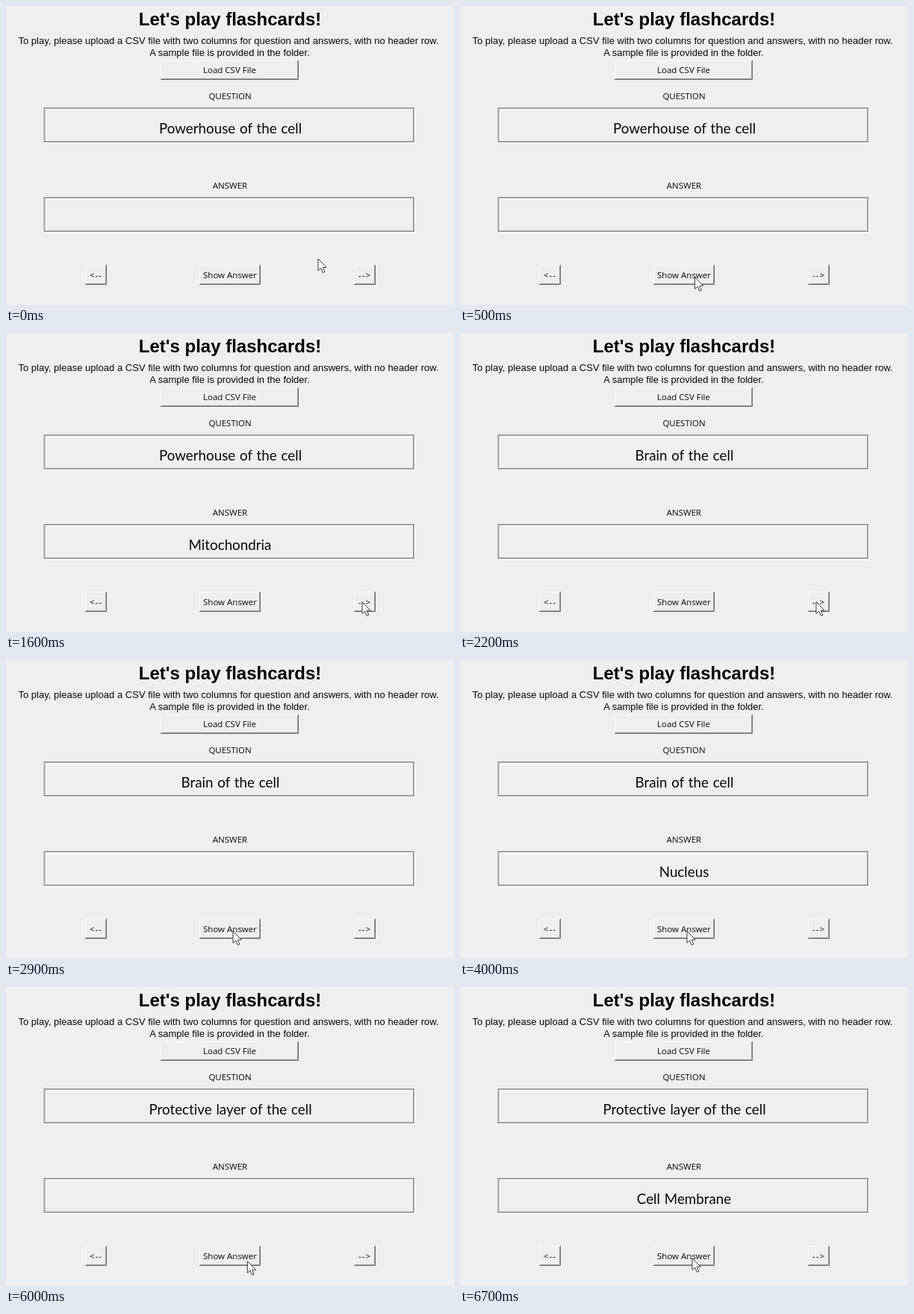
Recreate the animation shown at these times as an HTML page. Size 600x401 px, loop 7.1 s.

```html
<!DOCTYPE html>
<html lang="en">
<head>
<meta charset="utf-8">
<title>Flashcards</title>
<style>
  html, body { margin: 0; width: 100%; height: 100%; overflow: hidden; background: #f0eff0; }
  svg { display: block; width: 600px; height: 401px; }
  text { text-anchor: middle; fill: #080808; font-kerning: none; }
  .title { font: bold 24px "Liberation Sans", Arial, sans-serif; fill: #000; }
  .intro { font: 13px "Liberation Sans", Arial, sans-serif; }
  .wide { letter-spacing: .02px; }
  .label { font: 11.5px "Open Sans", "Segoe UI", sans-serif; }
  .arrow { letter-spacing: 1px; }
  .card { font: 18.8px Lato, Carlito, sans-serif; word-spacing: 1px; font-variant-ligatures: none; }
  .groove, .edge { fill: none; }
  .groove { stroke-width: 2; }
  .dark { stroke: #a0a0a0; }
  .light { stroke: #fbfbfb; }
  .outer { stroke: #696969; }
  .pressed .light { stroke: #696969; }
  .pressed .outer { stroke: #fff; }
  .pressed .dark { stroke: #e3e3e3; }
  .pressed text { transform: translate(1px, 1px); }
</style>
</head>
<body>
<svg viewBox="0 0 600 401">
  <text class="title" x="300" y="26">Let's play flashcards!</text>
  <text class="intro wide" x="298" y="51">To play, please upload a CSV file with two columns for question and answers, with no header row.</text>
  <text class="intro" x="299.5" y="67">A sample file is provided in the folder.</text>
  <text class="label" x="300" y="125">QUESTION</text>
  <text class="label" x="300" y="245">ANSWER</text>
  <g id="panels"></g>
  <g id="buttons"></g>
  <text class="card" id="question" x="300.5" y="171"></text>
  <text class="card" id="answer" x="300" y="291"></text>
  <path id="cursor" d="M.5 .5V16.5L4.2 13L6.8 19.2L9.3 18.2L6.8 12.2H11.6Z"
        fill="#fff" stroke="#3a3a3a" stroke-linejoin="round"/>
</svg>
<script>
const LOOP = 7100, STEP = 100;
const $ = id => document.getElementById(id);

const cards = [
  { from: 0, reveal: 1000, q: "Powerhouse of the cell", a: "Mitochondria" },
  { from: 2100, reveal: 3800, q: "Brain of the cell", a: "Nucleus" },
  { from: 5000, reveal: 6400, q: "Protective layer of the cell", a: "Cell Membrane" }
];

// Pointer trips: start, end, target x and y, downward bow
const trips = [
  [0, 500, 314, 363, 0],
  [1200, 1600, 476.5, 360, 0],
  [2300, 2900, 303.5, 363, 0],
  [4100, 4700, 477.5, 365, 4],
  [5500, 6100, 310.5, 363, 8]
];
const home = [417.5, 338.5];
const presses = { show: [900, 3700, 6300], next: [2000, 4900] };

const panel = y => `
  <rect class="groove light" x="53.5" y="${y + 2}" width="494.5" height="45"/>
  <rect class="groove dark" x="51.5" y="${y}" width="494.5" height="45"/>`;

const button = (id, x, y, w, h, label, cls = "") => `
  <g id="${id}">
    <path class="edge light" d="M${x + .5} ${y + h - 1}V${y + .5}H${x + w - 1}"/>
    <path class="edge dark" d="M${x + 1} ${y + h - 1.5}H${x + w - 1.5}V${y + 1}"/>
    <path class="edge outer" d="M${x} ${y + h - .5}H${x + w - .5}V${y}"/>
    <text class="label ${cls}" x="${x + w / 2}" y="${y + h - 9}">${label}</text>
  </g>`;

$("panels").innerHTML = panel(137) + panel(257);
$("buttons").innerHTML =
  button("load", 207, 73, 185, 26, "Load CSV File") +
  button("prev", 106, 347, 29, 27, "&lt;--", "arrow") +
  button("show", 259, 347, 82, 27, "Show Answer") +
  button("next", 466, 347, 29, 27, "--&gt;", "arrow");

function pointerAt(t) {
  let [x, y] = home;
  for (const [start, end, tx, ty, bow] of trips) {
    if (t < start) break;
    const p = Math.min(1, (t - start) / (end - start));
    const e = p * p * (3 - 2 * p);
    x += (tx - x) * e;
    y += (ty - y) * e + bow * Math.sin(Math.PI * p);
  }
  return [x, y];
}

function draw(t) {
  const card = cards.filter(c => t >= c.from).pop();
  $("question").textContent = card.q;
  $("answer").textContent = t >= card.reveal ? card.a : "";
  for (const id in presses) {
    const down = presses[id].some(s => t >= s && t < s + STEP);
    $(id).classList.toggle("pressed", down);
  }
  $("cursor").setAttribute("transform", `translate(${pointerAt(t)})`);
}

// The screen refreshes ten times a second
const begin = performance.now();
function tick() {
  const t = (performance.now() - begin) % LOOP;
  draw(Math.floor(t / STEP) * STEP);
  requestAnimationFrame(tick);
}
tick();
</script>
</body>
</html>
```
